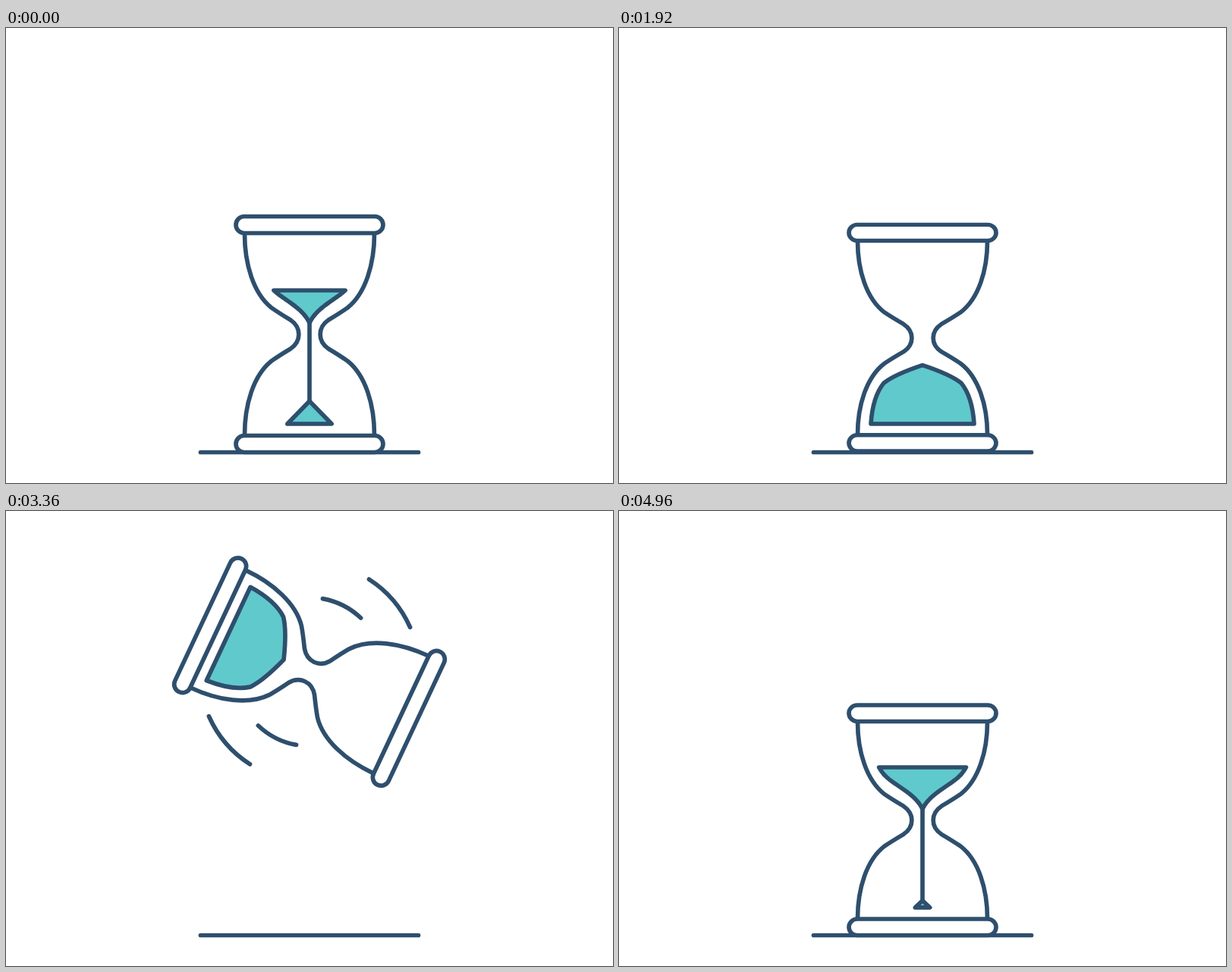
Recreate the animation shown at these times as an HTML page with a canvas. Size 800x600 px, loop 5.12 s.

```html
<!DOCTYPE html>
<html lang="en">
<head>
<meta charset="utf-8">
<title>Hourglass</title>
<style>
  html, body { margin: 0; width: 100%; height: 100%; overflow: hidden; background: #fff; }
  canvas { display: block; }
</style>
</head>
<body>
<canvas width="800" height="600"></canvas>
<script>
const ctx = document.querySelector('canvas').getContext('2d');
const INK = '#2e4f6d', SAND = '#60c9cc';
const STEP = 160, STEPS = 32, FLOOR = 559.5, HALF = 155.5, JUMP = 192;

const mix = (a, b, p) => a + (b - a) * p;
const linear = p => p;
const smooth = p => p * p * (3 - 2 * p);
const cubic = p => p < .5 ? 4 * p ** 3 : 1 - 4 * (1 - p) ** 3;

// Value at time t along [time, value] keys, eased within each span.
function track(t, ease, ...keys) {
  if (t <= keys[0][0]) return keys[0][1];
  for (let i = 1; i < keys.length; i++) {
    const [t0, v0] = keys[i - 1], [t1, v1] = keys[i];
    if (t < t1) return mix(v0, v1, ease((t - t0) / (t1 - t0)));
  }
  return keys[keys.length - 1][1];
}

function bezier(a, b, c, d, p) {
  const q = 1 - p;
  return q * q * q * a + 3 * q * q * p * b + 3 * q * p * p * c + p * p * p * d;
}

function shape(build, fill) {
  ctx.beginPath();
  build();
  if (fill) {
    ctx.fillStyle = fill;
    ctx.fill();
  }
  ctx.stroke();
}

const line = (x0, y0, x1, y1) => shape(() => {
  ctx.moveTo(x0, y0);
  ctx.lineTo(x1, y1);
});

function drawGlass() {
  for (const side of [-1, 1]) {
    shape(() => {
      ctx.moveTo(85.5 * side, -133);
      ctx.bezierCurveTo(85.5 * side, -93, 74 * side, -54, 50 * side, -35);
      ctx.quadraticCurveTo(40 * side, -28, 25 * side, -19);
      ctx.bezierCurveTo(10.5 * side, -9, 10.5 * side, 9, 25 * side, 19);
      ctx.quadraticCurveTo(40 * side, 28, 50 * side, 35);
      ctx.bezierCurveTo(74 * side, 54, 85.5 * side, 93, 85.5 * side, 133);
    });
    shape(() => ctx.roundRect(-97, 144.5 * side - 11, 194, 22, 11), '#fff');
  }
}

// Heap on the lower floor; q turns the cone into the full rounded shape.
function drawHeap(w, h, q) {
  const base = 118;
  const sx = mix(w * .6, 51, q), sy = base - mix(h * .4, 56, q);
  const a = [mix(w * .87, 66.5, q), base - mix(h * .13, 24, q)];
  const b = [mix(w * .73, 62, q), base - mix(h * .27, 42, q)];
  const c = [mix(w * .4, 40, q), mix(base - h * .6, 53, q)];
  const d = [mix(w * .2, 16, q), mix(base - h * .8, 43, q)];
  shape(() => {
    ctx.moveTo(-w, base);
    ctx.bezierCurveTo(-a[0], a[1], -b[0], b[1], -sx, sy);
    ctx.bezierCurveTo(-c[0], c[1], -d[0], d[1], 0, base - h);
    ctx.bezierCurveTo(d[0], d[1], c[0], c[1], sx, sy);
    ctx.bezierCurveTo(b[0], b[1], a[0], a[1], w, base);
    ctx.closePath();
  }, SAND);
}

// Sand in the upper bulb: the inner wall cut off at the sand level.
function drawFunnel(level, slump) {
  const wall = s => s < 1
    ? [bezier(68, 66.5, 62.5, 51, s), bezier(-118, -94, -76, -62, s)]
    : [bezier(51, mix(40, 38, slump), mix(16, 10, slump), 0, s - 1),
       bezier(-62, mix(-53, -47, slump), mix(-43, -37, slump), mix(-37.5, -15, slump), s - 1)];
  let lo = 0, hi = 2;
  for (let i = 0; i < 20; i++) {
    const mid = (lo + hi) / 2;
    if (wall(mid)[1] < level) lo = mid; else hi = mid;
  }
  const points = Array.from({ length: 41 }, (_, i) => wall(mix(lo, 2, i / 40)));
  shape(() => {
    points.forEach(([x, y]) => ctx.lineTo(-x, y));
    points.reverse().forEach(([x, y]) => ctx.lineTo(x, y));
    ctx.closePath();
  }, SAND);
}

function drawFlow(t) {
  const level = track(t, linear, [28.2, -118], [30, -85], [31, -71.5], [32, -58], [36.5, -15]);
  const h = track(t, linear, [30.5, 0], [31, 9.5], [32, 30], [33.5, 50], [36, 71], [39, 80.5]);
  const w = track(t, linear, [30.5, 0], [34, 68]);
  const top = track(t, linear, [36.6, -15], [37.6, 118 - h]);
  const bottom = Math.min(118 - h, track(t, linear, [29.5, -15], [30.5, 118]));
  if (t > 29.5 && bottom > top) line(0, top, 0, bottom);
  if (t > 30.5) drawHeap(w, h, track(t, smooth, [32.2, 0], [39, 1]));
  if (t < 36.5) drawFunnel(level, track(t, smooth, [28.2, 0], [29.6, 1]));
}

function drawSwooshes(t, turn) {
  const length = track(t, linear, [20, 0], [21.5, 50], [23, 16.5], [23.9, 0]);
  if (length < .5) return;
  const rad = Math.PI / 180;
  for (const [radius, lag] of [[145, 139], [98, 161.5]])
    for (const half of [0, 180]) {
      const head = turn - lag + half;
      shape(() => ctx.arc(0, 0, radius, (head - length) * rad, head * rad));
    }
}

function draw(step) {
  const t = step < 8 ? step + STEPS : step;
  const lift = track(t, cubic, [11.2, 0], [17.5, JUMP], [24.2, JUMP], [29.17, 0]);
  const squash = track(t, smooth, [10.5, 1], [12, .96], [13.5, 1], [28.6, 1], [30, .952], [32, 1]);
  const turn = track(t, cubic, [19.1, 0], [22.6, 186.3])
    - track(t, smooth, [22.6, 0], [25.2, 6.3]);

  ctx.clearRect(0, 0, 800, 600);
  ctx.strokeStyle = INK;
  ctx.lineWidth = 5.7;
  ctx.lineCap = ctx.lineJoin = 'round';
  line(256.5, FLOOR, 543.5, FLOOR);

  ctx.save();
  ctx.translate(400, FLOOR - lift);
  ctx.scale(1, squash);
  ctx.translate(0, -HALF);
  drawSwooshes(t, turn);
  ctx.save();
  if (t < 28) ctx.rotate(turn * Math.PI / 180);
  drawGlass();
  if (t < 28) drawHeap(68, 80.5, 1);
  ctx.restore();
  if (t >= 28) drawFlow(t);
  ctx.restore();
}

function tick() {
  draw(Math.floor(performance.now() / STEP) % STEPS);
  requestAnimationFrame(tick);
}
tick();
</script>
</body>
</html>
```
